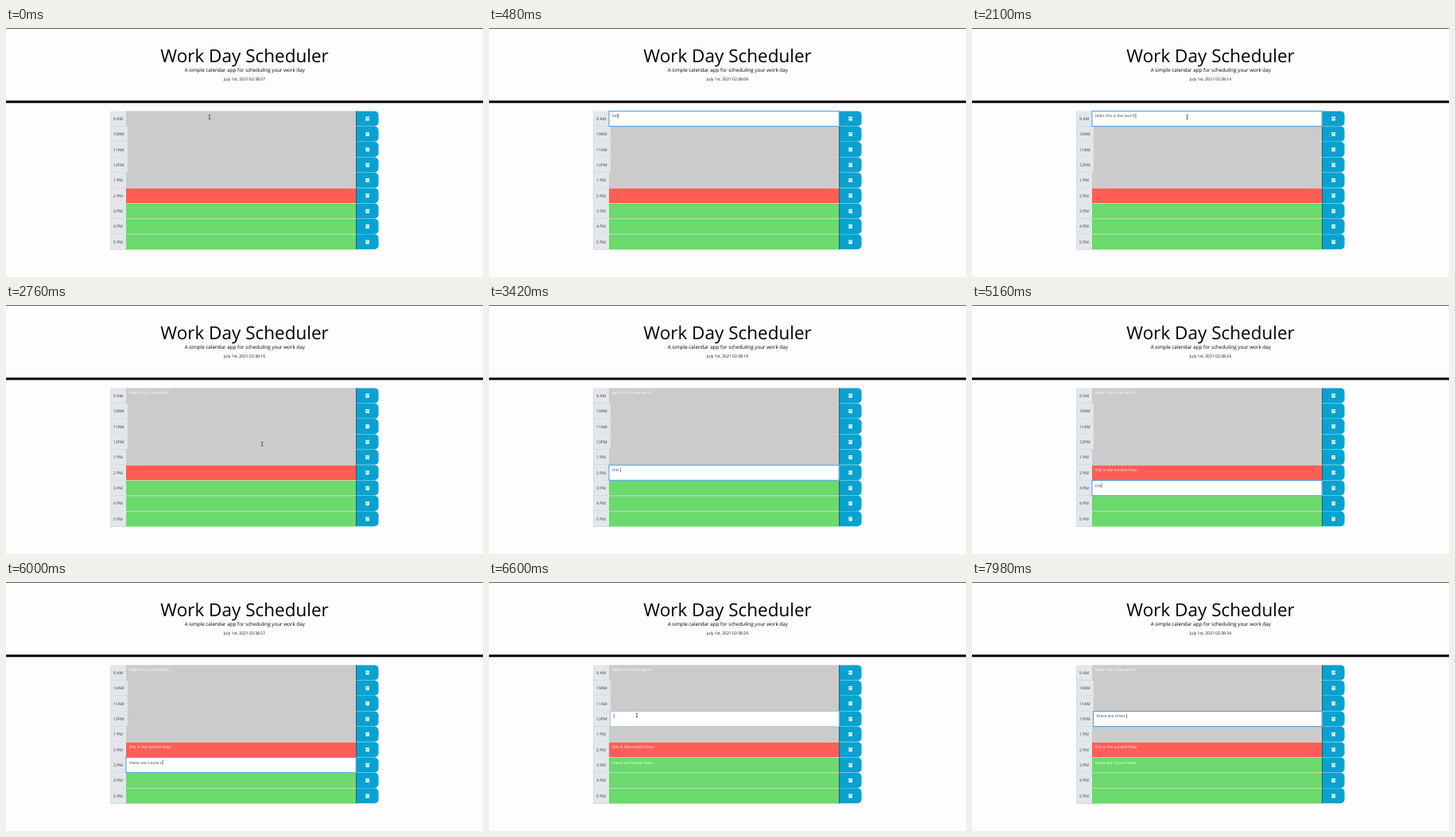
Write an HTML page with a canvas that moves like this. It is 600 px wide and 313 px high and loops after 8000 ms.

```html
<!DOCTYPE html>
<html lang="en">
<head>
<meta charset="utf-8">
<title>Work Day Scheduler</title>
<style>
html, body { margin: 0; width: 100%; height: 100%; overflow: hidden; background: #fdfdfe; }
canvas { display: block; width: 600px; height: 313px; }
</style>
</head>
<body>
<canvas id="stage"></canvas>
<script>
const LOOP = 8000, STEP = 60;
const TOP = 104.4, PITCH = 19.35, RIGHT = 440.6;
const HOURS = ['9 AM', '10AM', '11AM', '12PM', '1 PM', '2 PM', '3 PM', '4 PM', '5 PM'];
const PAST = '#cbcbcb', PRESENT = '#ff5e55', FUTURE = '#6bd96b';

// Each key press run: [time of first key, ms per key, number of keys]
const ENTRIES = [
  { row: 0, text: 'hello this is the test!!!!', focus: 60, blur: 2520, runs: [[360, 60, 26]] },
  { row: 5, text: 'this is the current hour', focus: 2940, blur: 4740, runs: [[3180, 52, 24]] },
  { row: 6, text: 'these are future times', focus: 4920, blur: 6420, runs: [[5040, 53, 22]] },
  { row: 3, text: 'these are times ', focus: 6560, blur: LOOP, runs: [[6960, 60, 3], [7260, 60, 13]] }
];

// Pointer trips; it hides while typing
const TRIPS = [
  { from: 0, to: 360, path: [[0, 256, 112], [360, 256, 112]] },
  { from: 2040, to: 3180, path: [[2040, 256, 112], [2400, 455, 114], [2580, 455, 114], [2880, 250, 208], [3180, 250, 208]] },
  { from: 4560, to: 5040, path: [[4560, 250, 208], [4700, 455, 211], [4770, 455, 211], [4900, 240, 229], [5040, 240, 229]] },
  { from: 6300, to: 6960, path: [[6300, 240, 229], [6400, 455, 231], [6430, 455, 231], [6560, 186, 167.5], [6960, 186, 167.5]] }
];

const canvas = document.getElementById('stage');
const c = canvas.getContext('2d');
const dpr = window.devicePixelRatio || 1;
canvas.width = 600 * dpr;
canvas.height = 313 * dpr;

const clamp = (v, a, b) => Math.min(b, Math.max(a, v));
const rowTop = i => TOP + i * PITCH;
const fieldLeft = i => i >= 1 && i <= 3 ? 152.7 : 151;
const rowColor = i => i < 5 ? PAST : i === 5 ? PRESENT : FUTURE;

function rect(x, y, w, h, color) {
  c.fillStyle = color;
  c.fillRect(x, y, w, h);
}

function text(s, x, y, size, color = '#000', align = 'left') {
  c.font = `${size}px "Open Sans", sans-serif`;
  c.textAlign = align;
  c.fillStyle = color;
  c.fillText(s, x, y);
}

function rounded(x, y, w, h, radii, color) {
  c.beginPath();
  c.roundRect(x, y, w, h, radii);
  c.fillStyle = color;
  c.fill();
}

function drawHeader(t) {
  rect(0, 0, 600, 0.8, '#3c3c3e');
  rect(0, 91.3, 600, 3, '#000');
  text('Work Day Scheduler', 300, 42.6, 22.5, '#000', 'center');
  text('A simple calendar app for scheduling your work day', 300.3, 55.2, 6.27, '#000', 'center');
  const sec = Math.floor(7.39 + t / 295);
  text('July 1st, 2021 02:38:' + String(sec).padStart(2, '0'), 300, 65.6, 5.05, '#111', 'center');
}

function drawButton(y) {
  rounded(RIGHT, y, 28, PITCH - 0.3, [0, 5, 5, 0], '#08a2d1');
  rect(RIGHT - 0.4, y, 0.9, PITCH - 0.3, '#24505f');
  rounded(452.2, y + 7.2, 5, 1.4, 0.4, '#fff');
  rounded(452.5, y + 9, 4.4, 3.2, [0, 0, 0.5, 0.5], '#fff');
  rect(453.9, y + 9.5, 1.6, 0.5, '#08a2d1');
}

function drawRow(i) {
  const y = rowTop(i), x = fieldLeft(i);
  rounded(131, y, x - 131, PITCH, [1, 0, 0, 1], '#e3e7ec');
  rect(131, y, 0.5, PITCH, '#cfd3d8');
  rect(131, y + PITCH - 0.5, x - 131, 0.6, '#c3c8cd');
  text(HOURS[i], 135, y + 11.6, 5.1, '#333a40');
  rect(x, y, RIGHT - x, PITCH + (i < 4 ? 0.2 : 0), rowColor(i));
  if (i > 4) rect(x, y - 0.4, RIGHT - x, 0.8, '#d3dcd3');
  drawButton(y);
}

function typed(entry, t) {
  let n = 0;
  for (const [start, gap, keys] of entry.runs)
    n += clamp(Math.floor((t - start) / gap) + 1, 0, keys);
  return entry.text.slice(0, n);
}

function drawEntry(entry, t) {
  if (t < entry.focus) return;
  const x = fieldLeft(entry.row), y = rowTop(entry.row);
  const s = typed(entry, t), tx = x + 3.9, base = y + 8;
  if (t >= entry.blur) {
    text(s, tx, base, 5.02, '#fff');
    return;
  }
  rect(x, y, RIGHT - x, PITCH, '#fff');
  c.strokeStyle = `rgba(86,160,222,${clamp((t - entry.focus) / 90, 0.4, 1)})`;
  c.lineWidth = 1.1;
  c.strokeRect(x - 0.1, y + 0.1, RIGHT - x - 0.3, PITCH - 0.3);
  text(s, tx, base, 5.02, '#3f464d');
  rect(tx + c.measureText(s).width + 0.2, y + 3.2, 0.6, 6, '#30363c');
}

function pointerAt(path, t) {
  let k = 1;
  while (k < path.length - 1 && t > path[k][0]) k++;
  const [t0, x0, y0] = path[k - 1], [t1, x1, y1] = path[k];
  const p = clamp((t - t0) / (t1 - t0), 0, 1), e = p * p * (3 - 2 * p);
  return [x0 + (x1 - x0) * e, y0 + (y1 - y0) * e];
}

function drawBeam(x, y) {
  c.beginPath();
  c.moveTo(x - 1.2, y - 2.7);
  c.quadraticCurveTo(x, y - 2.7, x, y - 1.6);
  c.quadraticCurveTo(x, y - 2.7, x + 1.2, y - 2.7);
  c.moveTo(x, y - 1.8);
  c.lineTo(x, y + 1.8);
  c.moveTo(x - 1.2, y + 2.7);
  c.quadraticCurveTo(x, y + 2.7, x, y + 1.6);
  c.quadraticCurveTo(x, y + 2.7, x + 1.2, y + 2.7);
  c.strokeStyle = '#333';
  c.lineWidth = 0.7;
  c.stroke();
}

function drawArrow(x, y) {
  c.beginPath();
  [[0, 0], [0, 6], [1.4, 4.8], [2.3, 6.8], [3.2, 6.4], [2.4, 4.5], [4.2, 4.4]]
    .forEach(([dx, dy]) => c.lineTo(x + dx, y + dy));
  c.closePath();
  c.fillStyle = '#111';
  c.fill();
  c.strokeStyle = '#fff';
  c.lineWidth = 0.5;
  c.stroke();
}

function drawPointer(t) {
  const trip = TRIPS.find(p => t >= p.from && t < p.to);
  if (!trip) return;
  const [x, y] = pointerAt(trip.path, t);
  (x > RIGHT ? drawArrow : drawBeam)(x, y);
}

function draw(now) {
  const t = Math.floor((now % LOOP) / STEP) * STEP;
  c.setTransform(dpr, 0, 0, dpr, 0, 0);
  c.textRendering = 'geometricPrecision';
  rect(0, 0, 600, 313, '#fdfdfe');
  drawHeader(t);
  HOURS.forEach((_, i) => drawRow(i));
  ENTRIES.forEach(e => drawEntry(e, t));
  drawPointer(t);
}

const began = performance.now();
function tick() {
  draw(performance.now() - began);
  requestAnimationFrame(tick);
}
tick();
</script>
</body>
</html>
```
